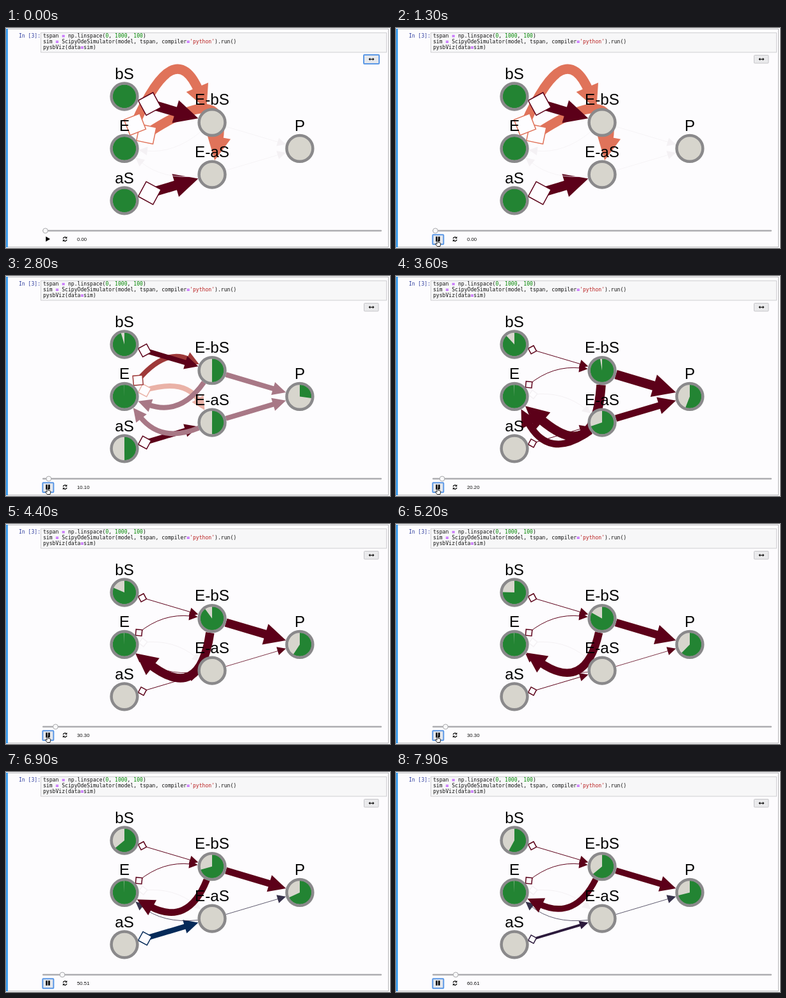
Recreate the animation shown at these times as an HTML page. Size 600 by 344 pixels, loop 8000 ms.

```html
<!DOCTYPE html>
<html lang="en">
<head>
<meta charset="utf-8">
<title>Reaction network simulation</title>
<style>
html, body { margin: 0; width: 100%; height: 100%; overflow: hidden; background: #fdfcfe; }
svg { display: block; width: 600px; height: 344px; }
text { white-space: pre; }
.code { font: 8.1px "DejaVu Sans Mono", monospace; fill: #111; }
.num { fill: #080; }
.op { fill: #a2f; font-weight: bold; }
.str { fill: #ba2121; }
.label { font: 24.2px "Liberation Sans", Arial, sans-serif; text-anchor: middle; }
.clock { font: 7.8px "Liberation Sans", Arial, sans-serif; fill: #111; }
.focus { fill: #e6e8ec; stroke: #5b98e6; stroke-width: 2; }
</style>
</head>
<body>
<svg viewBox="0 0 600 344">
  <rect width="600" height="344" fill="#fdfcfe"/>
  <rect x=".5" y="1.5" width="597" height="341" fill="none" stroke="#b5b5b8"/>
  <rect y="1" width="3" height="342" fill="#42a0ee"/>
  <rect x="54.5" y="7.5" width="540" height="30.5" fill="#f7f7f8" stroke="#cfcfd2"/>
  <g class="code">
    <text x="20" y="15.4" fill="#303f9f">In [3]:</text>
    <text x="58" y="15.4">tspan <tspan class="op">=</tspan> np.linspace(<tspan class="num">0</tspan>, <tspan class="num">1000</tspan>, <tspan class="num">100</tspan>)</text>
    <text x="58" y="24.4">sim <tspan class="op">=</tspan> ScipyOdeSimulator(model, tspan, compiler<tspan class="op">=</tspan><tspan class="str">'python'</tspan>).run()</text>
    <text x="58" y="33.4">pysbViz(data<tspan class="op">=</tspan>sim)</text>
  </g>

  <rect x="559.5" y="42.5" width="22.5" height="12.5" rx="1" fill="#eaeaec" stroke="#c6c6c9"/>
  <rect id="fitFocus" class="focus" x="559" y="42" width="24" height="14" rx="1"/>
  <path d="M566.5 48.8l2.6-2.3v1.7h3.8v-1.7l2.6 2.3-2.6 2.3v-1.7h-3.8v1.7z" fill="#111"/>

  <g id="edges"></g>
  <g id="nodes"></g>

  <rect x="57" y="315.8" width="530" height="2.5" rx="1" fill="#adadb0"/>
  <circle id="handle" cy="317" r="3.9" fill="#f8f8f9" stroke="#a9a9ac"/>
  <rect id="playFocus" class="focus" x="57.3" y="323.3" width="17" height="15" rx="1"/>
  <path id="play" d="M62.2 326v8l6.8-4z"/>
  <path id="pause" d="M62.2 326.3h2.6v7.4h-2.6zM66 326.3h2.6v7.4H66z"/>
  <g fill="none" stroke="#111" stroke-width="1.3">
    <path d="M89.2 329.4a3 3 0 0 1 5-1.6M95 330.8a3 3 0 0 1-5 1.6"/>
    <path d="M95.4 326v3.2h-3.2zM88.8 334.2V331H92z" fill="#111" stroke="none"/>
  </g>
  <text id="clock" class="clock" x="111" y="333"></text>

  <path id="hand" transform="translate(65 337.3)" d="M-1-5.2q1-1 1.8 0v3l3.1.8q1 .3.8 1.5L4 4.2H-.6L-3.6.6q0-1.2 1.2-.8l1.4.9z" fill="#fff" stroke="#111" stroke-width=".9"/>
  <path id="arrow" d="M0 0v7.6l1.8-1.6 1.4 3 1.2-.6-1.4-2.8h2.5z" fill="#111" stroke="#fff" stroke-width=".4"/>
</svg>
<script>
const LOOP = 8, CLICK = 1.3, FIRST = 2.3;
const RADIUS = 22.5, FULL = 15, DECAY = .907;
const MAROON = [92, 0, 25], ORANGE = [224, 115, 90], FAINT = [244, 241, 244];
const NAVY = [5, 42, 89], PLUM = [70, 16, 41], SLATE = [55, 50, 75];
const $ = id => document.getElementById(id);
const clamp = u => Math.min(Math.max(u, 0), 1);
const mix = (a, b, u) => a + (b - a) * u;
const pick = (list, n) => list[Math.min(n, list.length - 1)];

function set(el, attrs) {
  for (const k in attrs) el.setAttribute(k, attrs[k]);
}
function make(parent, tag, attrs) {
  const el = document.createElementNS("http://www.w3.org/2000/svg", tag);
  set(el, attrs);
  return parent.appendChild(el);
}
const show = (el, on) => set(el, { visibility: on ? "visible" : "hidden" });

// Share of each species, in 0..1, after n simulation steps.
const share = {
  bS: n => DECAY ** n,
  aS: n => n ? 0 : 1,
  E: n => n ? .995 : 1,
  "E-bS": n => n ? DECAY ** (n - 1) : 0,
  "E-aS": n => n === 1 ? 1 : 0,
  P: n => 1 - (share.aS(n) + share.bS(n)) / 2
};

// Reaction widths after n steps.
const binding = n => n ? 1 : FULL;
const retrace = n => pick([FULL, 1, 1, 1, 9, 8, 1], n);
const release = name => n => Math.max(.8, FULL * share[name](n));

const nodes = {};
function addNode(name, col, row) {
  const g = $("nodes"), cx = 185 + 137 * col, cy = 107 + 81.4 * row;
  make(g, "circle", { cx, cy, r: 20, fill: "#d7d5cd" });
  const pie = make(g, "circle", {
    cx, cy, r: 9.25, fill: "none", stroke: "#238433", "stroke-width": 18.5,
    pathLength: 100, transform: `rotate(-90 ${cx} ${cy})`
  });
  make(g, "circle", { cx, cy, r: 20.4, fill: "none", stroke: "#8a898b", "stroke-width": 4.5 });
  make(g, "text", { class: "label", x: cx, y: cy - 27.3 }).textContent = name;
  nodes[name] = { x: cx, y: cy, pie };
}
addNode("bS", 0, 0);
addNode("E", 0, 1);
addNode("aS", 0, 2);
addNode("E-bS", 1, .5);
addNode("E-aS", 1, 1.5);
addNode("P", 2, 1);

const edges = [];
function addEdge(from, to, width, colors, { curved = false, diamond = false }) {
  const g = $("edges");
  edges.push({
    a: nodes[from], b: nodes[to], width, colors, curved,
    shaft: make(g, "path", { fill: "none" }),
    head: make(g, "path", {}),
    diamond: diamond && make(g, "rect", { fill: "#fefdff", "stroke-width": 1.5 })
  });
}
const cooling = [FAINT, MAROON, MAROON, MAROON, SLATE];
addEdge("E", "E-aS", binding, [ORANGE, FAINT], { curved: true, diamond: true });
addEdge("E", "E-bS", binding, [ORANGE, MAROON], { curved: true, diamond: true });
addEdge("bS", "E-bS", binding, [MAROON], { diamond: true });
addEdge("aS", "E-aS", retrace, [MAROON, MAROON, MAROON, MAROON, NAVY, NAVY, PLUM], { diamond: true });
addEdge("E-aS", "E", release("E-aS"), cooling, { curved: true });
addEdge("E-bS", "E", release("E-bS"), [FAINT, MAROON], { curved: true });
addEdge("E-bS", "P", release("E-bS"), [FAINT, MAROON], {});
addEdge("E-aS", "P", release("E-aS"), cooling, {});

// Thick arrows need room, so the control point moves away from the chord.
function controlPoint({ a, b, curved, diamond }, w) {
  const mid = { x: (a.x + b.x) / 2, y: (a.y + b.y) / 2 };
  if (!curved) return mid;
  const len = Math.hypot(b.x - a.x, b.y - a.y);
  const ux = (b.x - a.x) / len, uy = (b.y - a.y) / len;
  const push = (w / FULL) ** 2.5;
  const along = (diamond ? 55 : -20) * push, out = 30 + 120 * push;
  return { x: mid.x + ux * along + uy * out, y: mid.y + uy * along - ux * out };
}

function drawEdge(e, n, u) {
  const w = mix(e.width(n), e.width(n + 1), u);
  const next = pick(e.colors, n + 1);
  const color = `rgb(${pick(e.colors, n).map((v, i) => Math.round(mix(v, next[i], u)))})`;
  const size = Math.max(13.5, 3.25 * w ** .9);
  const c = controlPoint(e, w);
  const out = Math.atan2(c.y - e.a.y, c.x - e.a.x), back = Math.atan2(c.y - e.b.y, c.x - e.b.x);
  const from = r => [e.a.x + Math.cos(out) * r, e.a.y + Math.sin(out) * r];
  const toward = (r, side = 0) => [
    e.b.x + Math.cos(back) * r - Math.sin(back) * side,
    e.b.y + Math.sin(back) * r + Math.cos(back) * side
  ];
  const [x, y] = from(RADIUS + (e.diamond ? size / 2 : 0));
  set(e.shaft, { d: `M${x},${y}Q${c.x},${c.y} ${toward(RADIUS + size * .8)}`, stroke: color, "stroke-width": w });
  set(e.head, {
    d: `M${toward(RADIUS)}L${toward(RADIUS + size, size / 2)}L${toward(RADIUS + size, -size / 2)}Z`, fill: color
  });
  if (!e.diamond) return;
  const side = size * Math.SQRT1_2;
  set(e.diamond, {
    x: x - side / 2, y: y - side / 2, width: side, height: side, stroke: color,
    transform: `rotate(${out * 180 / Math.PI + 45} ${x} ${y})`
  });
}

function drawCursor(t) {
  const over = t > .7 && t < 5.7;
  show($("hand"), over);
  show($("arrow"), !over);
  const away = 1 - clamp((t - .3) / .4) + clamp((t - 6) / .6);
  set($("arrow"), { transform: `translate(65 ${336.6 + 10 * away})` });
}

function draw(t) {
  const run = Math.max(0, t - FIRST), n = Math.floor(run), u = run - n;
  const step = t < FIRST ? 0 : n + 1, playing = t >= CLICK;
  edges.forEach(e => drawEdge(e, n, u));
  for (const name in nodes) {
    const part = 100 * mix(share[name](n), share[name](n + 1), u);
    set(nodes[name].pie, { "stroke-dasharray": `${part} 100` });
  }
  show($("fitFocus"), !playing);
  show($("playFocus"), playing);
  show($("play"), !playing);
  show($("pause"), playing);
  set($("handle"), { cx: 61.5 + 5.3 * step });
  $("clock").textContent = (step * 1000 / 99).toFixed(2);
  drawCursor(t);
}

const start = performance.now();
function tick() {
  draw((performance.now() - start) / 1000 % LOOP);
  requestAnimationFrame(tick);
}
tick();
</script>
</body>
</html>
```
